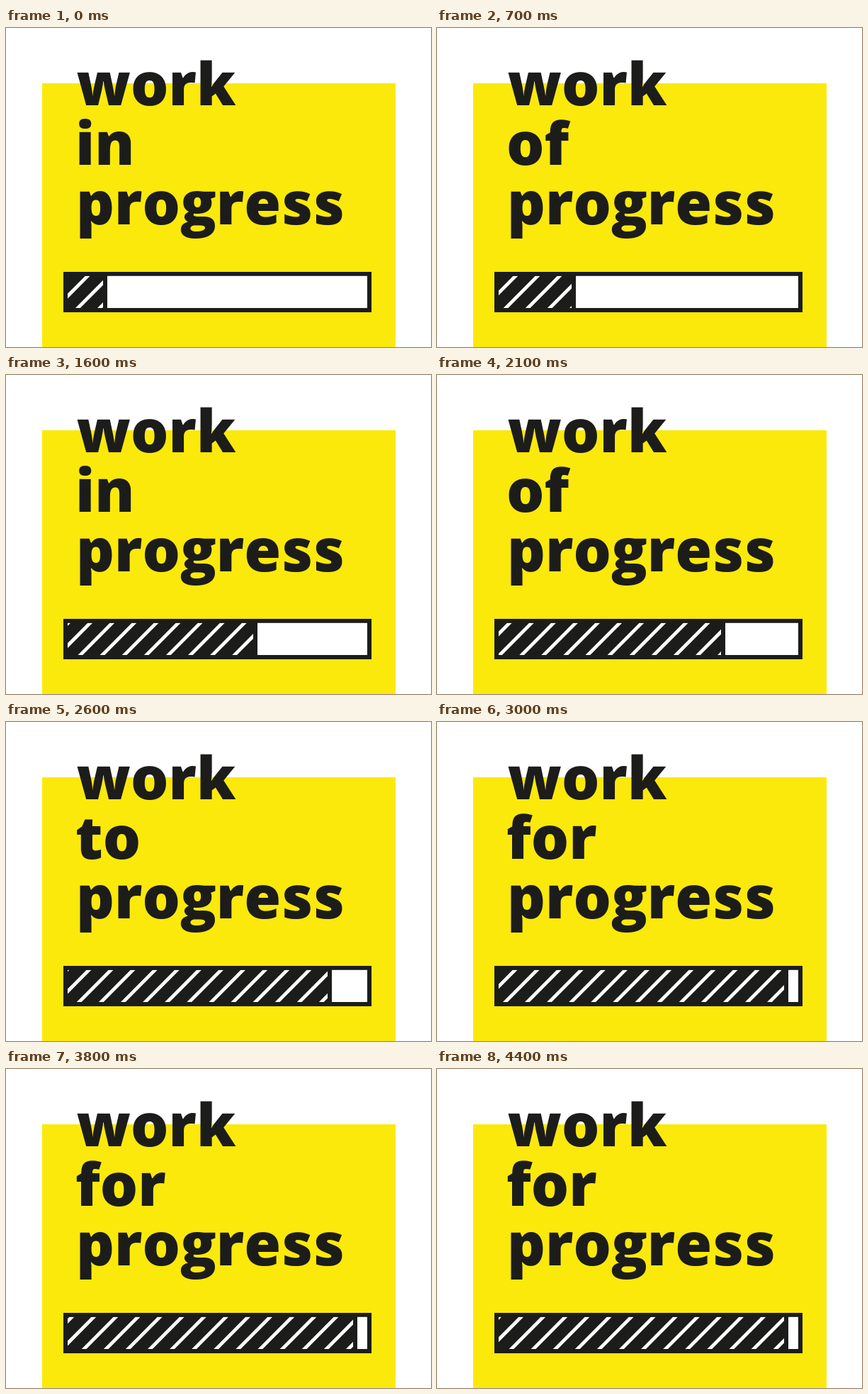
An HTML page for the animation above (4.5 s loop, 600 by 450 pixels).

```html
<!DOCTYPE html>
<html lang="en">
<head>
<meta charset="utf-8">
<title>Work in progress</title>
<style>
  html, body { margin: 0; width: 100%; height: 100%; overflow: hidden; background: #fff; }
  svg { display: block; }
  text { font: 800 84px "Open Sans", "Noto Sans", sans-serif; font-kerning: none; }
  .ink { fill: #1c1c1b; }
  .paper { fill: #fff; }
  .card { fill: #fbe90b; }
</style>
</head>
<body>
<svg width="600" height="450" viewBox="0 0 600 450">
  <rect class="card" x="51" y="78" width="499" height="372"/>
  <g class="ink">
    <text x="99.5" y="109">work</text>
    <text id="word" x="98" y="193">in</text>
    <text x="99" y="277">progress</text>
    <rect x="81" y="344" width="435" height="57"/>
  </g>
  <rect id="rest" class="paper" y="349.8" height="45.2"/>
  <svg id="window" x="87" y="349.8" height="45.2">
    <path id="stripes" class="paper"/>
  </svg>
</svg>
<script>
  const STEP = 100, STEPS = 45;
  const WORDS = ["in", "of", "to", "for"];
  const STAGE_STEPS = 4, LAST_STAGE = 7;
  const TURN = 30;                     // stripes run backwards after this step
  const PITCH = 31.1, SPEED = -9.5, STRIPE = 6.8;
  const LEFT = 87, RIGHT = 510, HEIGHT = 45.2, LEAN = 45;

  const el = id => document.getElementById(id);
  const word = el("word"), rest = el("rest");
  const opening = el("window"), stripes = el("stripes");

  let d = "";
  for (let x = -3 * PITCH; x < RIGHT - LEFT; x += PITCH)
    d += `M${x} ${HEIGHT}l${LEAN} ${-HEIGHT}h${STRIPE}l${-LEAN} ${HEIGHT}z`;
  stripes.setAttribute("d", d);

  function draw(step) {
    const stage = Math.min(Math.floor(step / STAGE_STEPS), LAST_STAGE);
    const end = Math.min(Math.floor(143.6 + 52.85 * stage), 496);
    const travel = 11 + SPEED * Math.min(step, 2 * TURN - step);
    const shift = ((travel % PITCH) + PITCH) % PITCH;

    word.textContent = WORDS[stage % WORDS.length];
    rest.setAttribute("x", end);
    rest.setAttribute("width", RIGHT - end);
    opening.setAttribute("width", end - 6 - LEFT);
    stripes.setAttribute("transform", `translate(${shift})`);
  }

  const start = performance.now();
  function tick() {
    draw(Math.floor((performance.now() - start) / STEP) % STEPS);
    requestAnimationFrame(tick);
  }
  tick();
</script>
</body>
</html>
```
